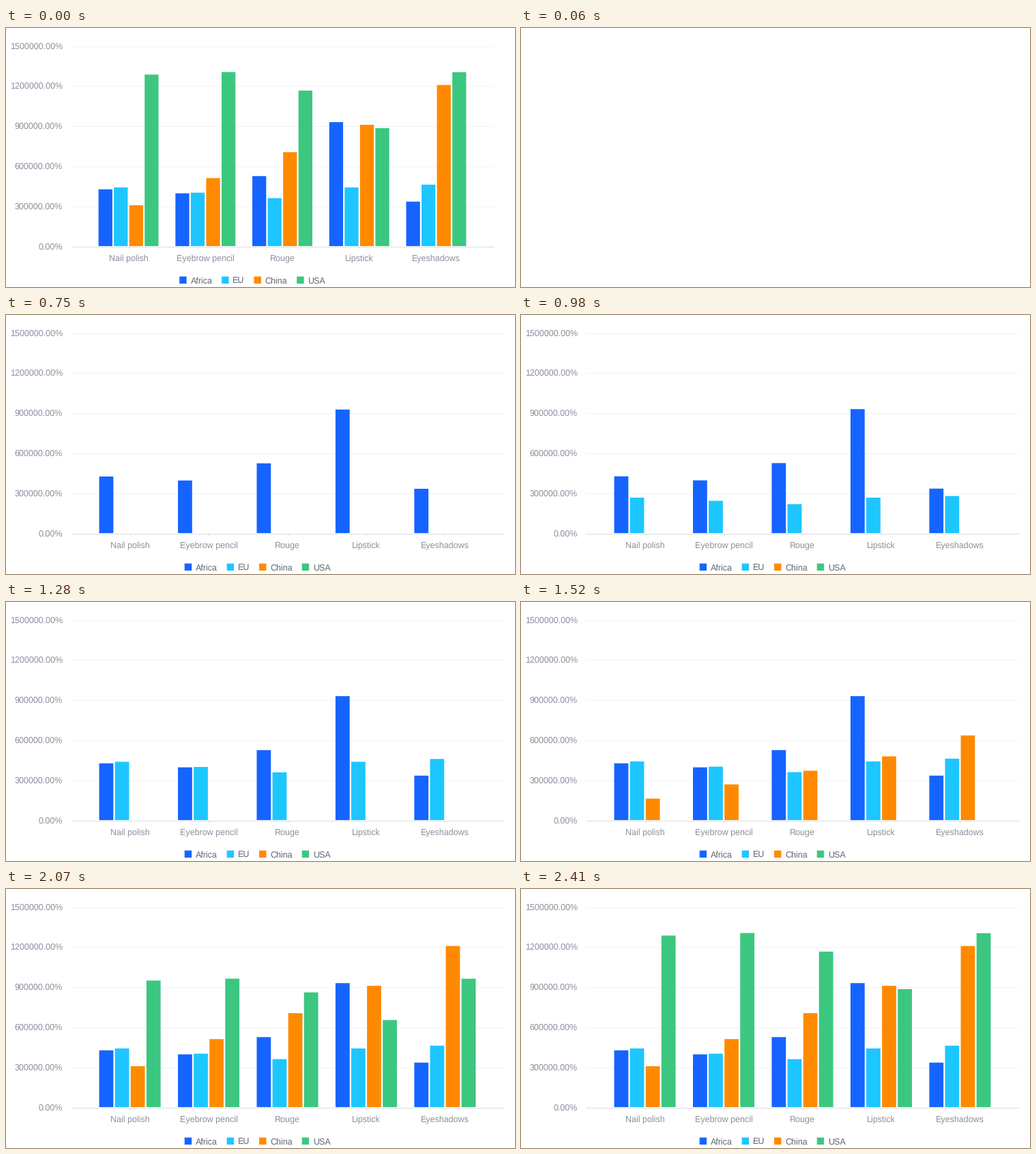
Recreate the animation shown at these times as a matplotlib script. Size 746 by 380 pixels, loop 2710 ms.

```python
import math

import matplotlib.pyplot as plt
from matplotlib.animation import FuncAnimation
from matplotlib.patches import Rectangle

W, H, DPI = 746, 380, 100
LOOP_MS, TICK_MS = 2710, 10
CLEAR_MS, LAST_GAP_STEPS = 60, 9
REFRESH_MS = 56
LEFT, BASE = 95, 320
PX_PER_K = 294 / 1500

AXIS, GRID, LABEL, LEGEND = "#d9dde4", "#f1f2f5", "#89909d", "#606773"

plt.rcParams["font.family"] = "Liberation Sans"
plt.rcParams["text.hinting"] = "none"

PRODUCTS = ["Nail polish", "Eyebrow pencil", "Rouge", "Lipstick", "Eyeshadows"]
# name, colour, values in thousands, first refresh, growth start, growth time
SERIES = [
    ("Africa", "#1664ff", [425, 395, 524, 928, 333], 300, 321, 500),
    ("EU", "#1ec6ff", [439, 400, 359, 439, 460], 870, 849, 500),
    ("China", "#ff8a00", [306, 509, 703, 908, 1206], 1460, 1406, 500),
    ("USA", "#3cc780", [1284, 1303, 1164, 883, 1302], 1960, 1919, 425),
]

fig = plt.figure(figsize=(W / DPI, H / DPI), dpi=DPI, facecolor="white")
ax = fig.add_axes([0, 0, 1, 1])
ax.set_xlim(0, W)
ax.set_ylim(H, 0)
ax.axis("off")


def label(x, y, text, color, ha):
    return ax.text(x, y, text, color=color, ha=ha, va="baseline",
                   fontsize=12.5 * 72 / DPI)


def line(xs, ys, color):
    return ax.plot(xs, ys, color=color, lw=72 / DPI, zorder=1,
                   solid_capstyle="butt")[0]


def box(x, y, w, h, color):
    return ax.add_patch(Rectangle((x, y), w, h, fc=color, lw=0, snap=False,
                                  zorder=3))


class Chart:
    def __init__(self, right):
        self.parts, self.bars = [], []
        self.add_scale(right)
        self.add_bars((right - LEFT) / 5.5)
        self.add_legend(right / 2 - 103.3)

    def add_scale(self, right):
        for k in range(1500, -1, -300):
            y = math.floor(BASE - k * PX_PER_K) + 0.5
            self.parts += [
                line([LEFT, right], [y, y], GRID if k else AXIS),
                label(83, y + 4, f"{k * 1000}.00%", LABEL, "right")]

    def add_bars(self, step):
        pitch = step * 0.2
        width = pitch * 0.9
        for i, product in enumerate(PRODUCTS):
            mid = LEFT + step * (i + 0.75)
            self.parts += [line([mid, mid], [BASE, BASE + 4], AXIS),
                           label(mid, 342, product, LABEL, "center")]
            x = mid - (3 * pitch + width) / 2
            for j, (_, color, values, _, start, length) in enumerate(SERIES):
                bar = box(x + j * pitch, BASE, width, 0, color)
                self.bars.append((bar, values[i] * PX_PER_K, start, length))
                self.parts.append(bar)

    def add_legend(self, x):
        for name, color, *_ in SERIES:
            text = label(x + 16.3, 374.4, name, LEGEND, "left")
            self.parts += [box(x, 364.6, 10.4, 10.4, color), text]
            x += text.get_window_extent().width + 30

    def show(self, on):
        for part in self.parts:
            part.set_visible(on)

    def grow(self, ms):
        for bar, full, start, length in self.bars:
            t = min(max((ms - start) / length, 0), 1)
            h = full * (1 - (1 - t) ** 3)
            bar.set_y(BASE - h)
            bar.set_height(h)


narrow, wide = Chart(715), Chart(730)
narrow.grow(LOOP_MS)


def refresh_time(ms):
    """Latest refresh at or before ms; each series sets off its own run."""
    first = max((s[3] for s in SERIES if s[3] <= ms), default=0)
    steps = (ms - first + TICK_MS // 2) // REFRESH_MS
    return first + REFRESH_MS * min(steps, LAST_GAP_STEPS)


def update(frame):
    ms = frame * TICK_MS
    narrow.show(ms < CLEAR_MS)
    wide.show(ms >= SERIES[0][3])
    wide.grow(refresh_time(ms))
    return narrow.parts + wide.parts


anim = FuncAnimation(fig, update, frames=LOOP_MS // TICK_MS, interval=TICK_MS,
                     repeat=True, repeat_delay=0, blit=False)
plt.show()
```
